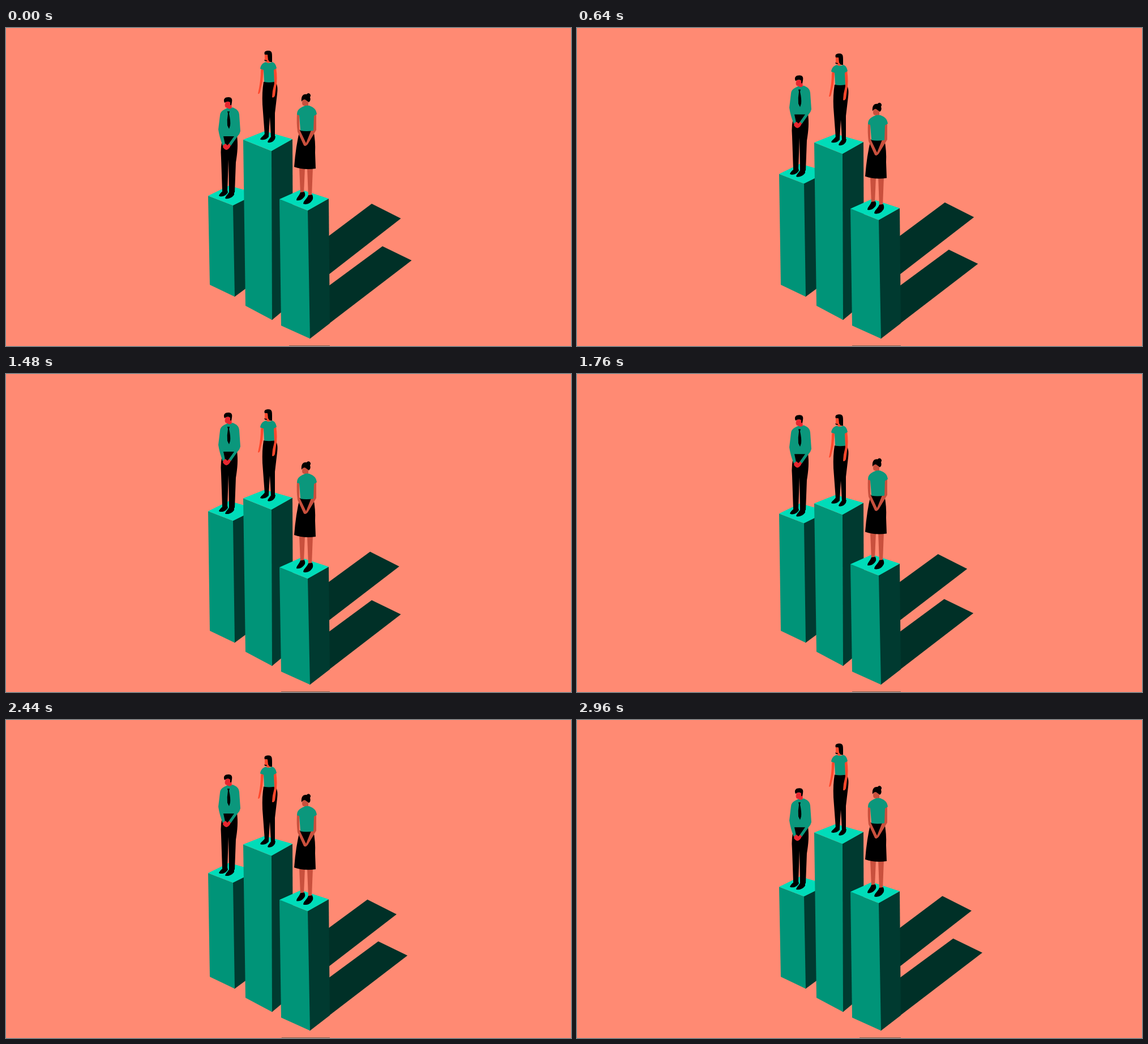
These frames come from a looping animation (998 px wide and 561 px high, 3 s). An HTML page with a canvas:

```html
<!DOCTYPE html>
<html lang="en">
<head>
<meta charset="utf-8">
<title>Columns</title>
<style>
  html, body { margin: 0; width: 100%; height: 100%; overflow: hidden; background: #ff8a73; }
  canvas { display: block; width: 998px; height: 561px; }
</style>
</head>
<body>
<canvas id="stage" width="998" height="561"></canvas>
<script>
const ctx = document.getElementById('stage').getContext('2d');
const LOOP = 3000, STEP = 40;
const BG = '#ff8a73', FRONT = '#009478', SIDE = '#003a30', TOP = '#00dcb9',
      SHADOW = '#003027', SHIRT = '#0b977c', BLACK = '#000';

// Linear interpolation through [time, value] keys.
function track(keys, t) {
  for (let i = 1; i < keys.length; i++) {
    const [t0, a] = keys[i - 1], [t1, b] = keys[i];
    if (t <= t1) return a + (b - a) * (t - t0) / (t1 - t0);
  }
  return keys[keys.length - 1][1];
}

function poly(color, pts) {
  ctx.fillStyle = color;
  ctx.beginPath();
  pts.forEach(([x, y]) => ctx.lineTo(x, y));
  ctx.closePath();
  ctx.fill();
}

const part = (color, d) => ({ color, path: new Path2D(d) });

const man = [
  part(BLACK, 'M376 296C378 291 382 289 384 286L391 286L392 290C389 295 384 298 378 297Z'),
  part(BLACK, 'M387 300C389 295 393 292 395 288L403 289L403 294C400 299 393 302 388 301Z'),
  part(BLACK, 'M384 190L408 190C410 205 409 220 406 237L404 290Q399 292 394 290L393 232L391 289Q387 290 382 288L380 230Q378 208 384 190Z'),
  part('#e8262f', 'M388 130L398 130L399 143Q395 148 391 144L391 141C387 141 386 137 387 134Z'),
  part(SHIRT, 'M391 141Q395 145 400 140C407 143 411 145 412 153L414 182Q413 187 409 191L397 208L393 205L403 191L384 191L387 205L383 208Q377 193 375 179L378 154C379 146 384 145 391 141Z'),
  part('#e8262f', 'M384 206L388 204L391 207L394 204L397 207Q395 213 390 215Q386 215 383 210Z'),
  part(BLACK, 'M391 147L395 147L394 151Q397 164 396 172L394 178L391 172Q390 162 392 151Z'),
  part(BLACK, 'M386 132C383 125 387 122 393 122C399 122 400 126 399 131L398 136L396 136L396 131Q391 128 386 132Z')
];

const leader = [
  part(BLACK, 'M449 196C451 192 455 190 457 187L464 188L464 192C460 197 454 198 450 197Z'),
  part(BLACK, 'M462 201C464 196 467 194 469 190L476 191L475 196C472 201 467 203 463 202Z'),
  part('#ff482c', 'M451 70L455 73L453 95L449 112Q448 117 445 116L447 106Q450 90 450 76Z'),
  part(BLACK, 'M455 95L476 95C480 101 480 108 479 116L475 150L475 193Q471 195 468 192L466 157L464 190Q460 191 457 189L453 135Q452 112 455 95Z'),
  part('#ff482c', 'M472 71L477 70Q480 90 477 104L475 119Q473 124 470 122L471 111L474 98Z'),
  part(SHIRT, 'M459 60Q464 63 470 60C475 61 477 66 478 71L473 74L474 95Q464 97 456 95L455 74L449 72C450 65 453 62 459 60Z'),
  part(BLACK, 'M457 47C455 41 459 40 464 40C470 40 470 45 470 51L470 60L462 60L461 47Z'),
  part('#ff482c', 'M457 47L462 47L463 56L466 60Q463 63 460 60L460 58L457 56Z'),
  part(BLACK, 'M456 56L461 57L460 59L457 58Z')
];

const worker = [
  part('#c9503d', 'M518 246L528 246L526 293L520 293Z'),
  part('#c9503d', 'M532 246L542 246L540 298L534 298Z'),
  part(BLACK, 'M513 304C513 299 518 296 520 290L527 289Q530 295 526 299C522 304 516 305 513 304Z'),
  part(BLACK, 'M525 310C526 304 531 302 534 295L541 294Q544 301 540 305C536 311 528 312 525 310Z'),
  part(BLACK, 'M519 180L543 180Q547 200 546 220L547 248Q526 251 509 245Q512 207 519 180Z'),
  part('#c9503d', 'M514 151L518 152L518 178L530 203L540 178L544 152L548 152L548 180L533 205Q529 210 526 207L515 183Q513 168 514 151Z'),
  part('#c9503d', 'M524 126L534 126L534 140L527 140L527 137Q523 137 523 132Z'),
  part(SHIRT, 'M526 138Q530 136 536 137C543 140 548 143 549 152L544 155L543 181Q530 183 520 181L518 154L514 153C514 143 520 141 526 138Z'),
  part(BLACK, 'M522 130C521 120 525 116 531 117Q532 115 535 115Q540 118 537 122Q539 128 535 131Q531 128 528 126Q524 126 522 130Z')
];

// Top corners: left, front, right, back. Base corners: left, front, right.
const columns = [
  { top: [[357, 296], [401, 313], [443, 292], [394, 278]],
    base: [[360, 453], [404, 474], [446, 443]], figure: man,
    lift: [[0, 0], [1020, -61.3], [2020, -45.7], [LOOP, 0]] },
  { top: [[419, 197], [469, 217], [506, 196], [457, 182]],
    base: [[423, 490], [470, 515], [507, 484]], figure: leader,
    lift: [[0, 0], [1020, 7.8], [2020, 39.4], [LOOP, 0]] },
  { top: [[483, 302], [533, 322], [570, 301], [521, 285]],
    base: [[486, 525], [537, 548], [572, 521]], figure: worker,
    lift: [[0, 0], [1520, 40], [LOOP, 0]] }
];

const shadows = [
  { root: [[570, 367], [570, 435]], tip: [[646, 310], [697.5, 336]],
    dx: [[0, 0], [1020, 6], [2020, -13.3], [LOOP, 0]],
    dy: [[0, 0], [1020, -3.7], [2020, 11.7], [LOOP, 0]] },
  { root: [[570, 455], [570, 522]], tip: [[665, 385], [716.5, 410]],
    dx: [[0, 0], [1520, -19.5], [LOOP, 0]],
    dy: [[0, 0], [1520, 14.4], [LOOP, 0]] }
];

function drawShadow({ root, tip, dx, dy }, t) {
  const x = track(dx, t), y = track(dy, t);
  const [a, b] = tip.map(p => [p[0] + x, p[1] + y]);
  poly(SHADOW, [root[0], a, b, root[1]]);
}

function drawColumn({ top, base, figure, lift }, t) {
  const dy = track(lift, t);
  const cap = top.map(([x, y]) => [x, y + dy]);
  const [l, f, r] = cap;
  poly(SIDE, [[f[0] - 1, f[1]], r, base[2], base[1], [base[1][0] - 1, base[1][1]]]);
  poly(FRONT, [l, f, base[1], base[0]]);
  poly(TOP, cap);
  ctx.save();
  ctx.translate(0, dy);
  for (const { color, path } of figure) {
    ctx.fillStyle = color;
    ctx.fill(path);
  }
  ctx.restore();
}

// Faint sliver along the bottom edge of the stage.
function drawSliver(t) {
  const x = 500 - 14 * Math.min(1, track(columns[2].lift, t) / 16);
  ctx.fillStyle = 'rgba(0, 58, 48, 0.5)';
  ctx.fillRect(x, 560, 572 - x, 1);
}

function draw(t) {
  ctx.fillStyle = BG;
  ctx.fillRect(0, 0, 998, 561);
  shadows.forEach(s => drawShadow(s, t));
  columns.forEach(c => drawColumn(c, t));
  drawSliver(t);
}

let start;
function tick(now) {
  if (start === undefined) start = now;
  const t = Math.max(0, now - start) % LOOP;
  draw(Math.floor(t / STEP) * STEP);
  requestAnimationFrame(tick);
}
draw(0);
requestAnimationFrame(tick);
</script>
</body>
</html>
```
